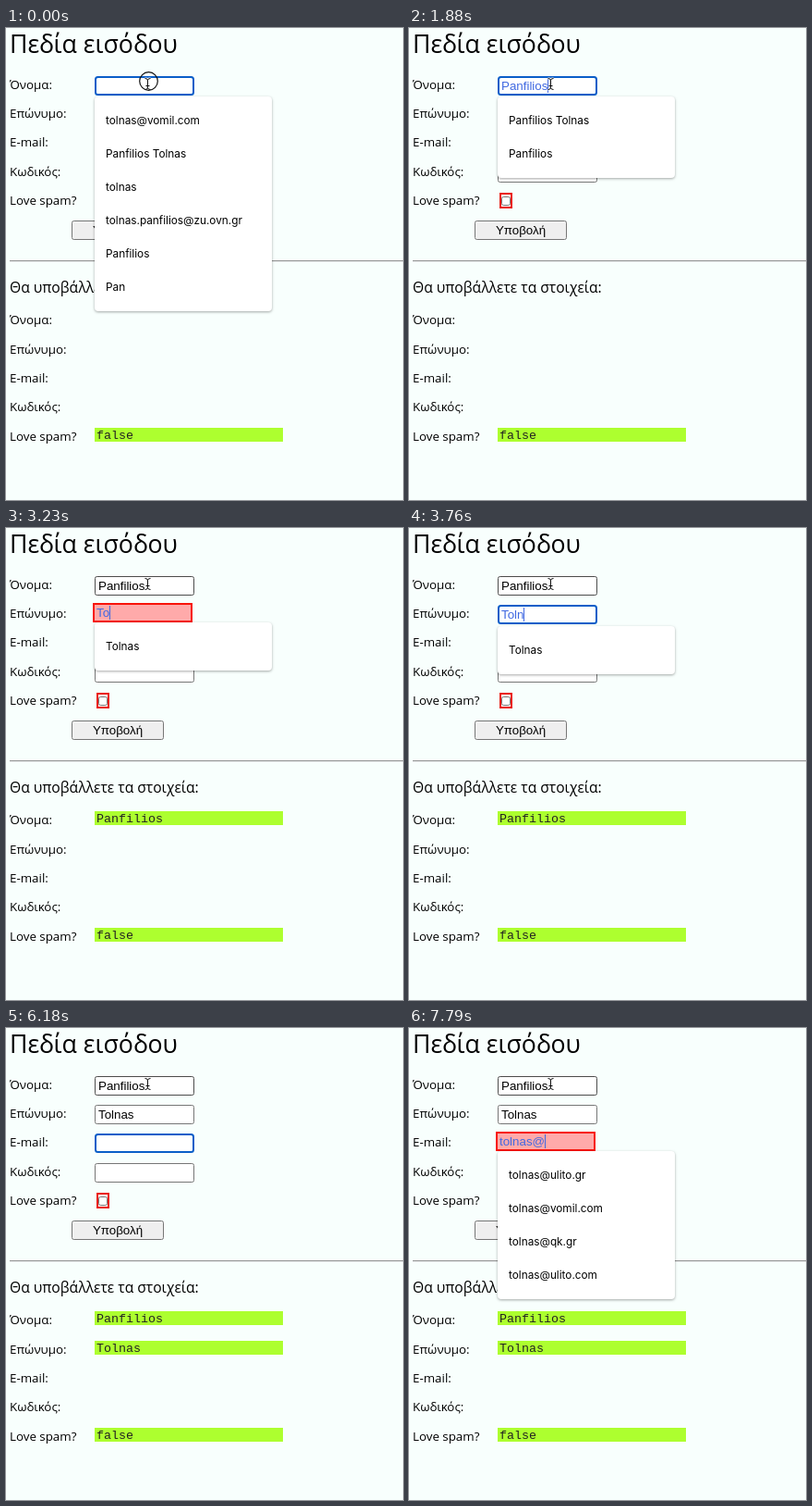
Animation of 430x510 px, one loop 8000 ms. Source, as an HTML page with a canvas:

```html
<!DOCTYPE html>
<html lang="el">
<head>
<meta charset="utf-8">
<style>
html, body { margin: 0; width: 430px; height: 510px; overflow: hidden; background: #f8fffd; }
canvas { display: block; }
</style>
</head>
<body>
<canvas id="stage" width="430" height="510"></canvas>
<script>
const ctx = document.getElementById('stage').getContext('2d');
const LOOP = 8000;
const LABEL = '13.333px "Open Sans", sans-serif';
const HEADING = '26.667px "Open Sans", sans-serif';
const SUBHEADING = '15.6px "Open Sans", sans-serif';
const INPUT = '13.333px "Liberation Sans", Arial, sans-serif';
const MONO = '13.333px "Liberation Mono", monospace';
const MENU = '11.8px Inter, sans-serif';

const labels = ['Όνομα:', 'Επώνυμο:', 'E-mail:', 'Κωδικός:', 'Love spam?'];
const formRows = [66, 97, 128, 160, 191];
const echoRows = [320, 352, 383, 414, 446];
const fieldTops = [52, 83, 114, 146];
const values = ['Panfilios', 'Tolnas', 'tolnas@'];

const full = 'Panfilios Tolnas', first = 'Panfilios', nick = 'Pan', variant = 'Panfilis';
const mails = ['tolnas@ulito.gr', 'tolnas@vomil.com', 'tolnas@qk.gr', 'tolnas@ulito.com'];
const longMail = 'tolnas.panfilios@zu.ovn.gr';
const all = [mails[1], full, 'tolnas', longMail, first, nick];
const four = [full, nick, first, variant];
const three = [full, first, variant];
const two = [full, first];
const one = ['Tolnas'];

// start time, focused field, typed characters, menu items, menu top, flags
const steps = [
  [0, 0, 0, all, 74, 'click'],
  [270, 0, 2, four, 71, 'invalid caret'],
  [540, 0, 3, four, 74, 'caret'],
  [810, 0, 4, three, 74, 'caret'],
  [1080, 0, 6, three, 74, 'caret'],
  [1350, 0, 7, three, 74, 'caret'],
  [1610, 0, 8, two, 74, 'caret'],
  [1880, 0, 9, two, 74, 'caret'],
  [2150, 1, 0, null, 0, 'caret'],
  [2690, 1, 0, null, 0, ''],
  [3230, 1, 2, one, 102, 'invalid caret'],
  [3490, 1, 3, one, 102, 'caret'],
  [3760, 1, 4, one, 106, 'caret'],
  [4030, 1, 5, one, 106, 'caret'],
  [4290, 1, 6, null, 0, 'caret'],
  [4830, 2, 0, null, 0, 'caret'],
  [5370, 2, 0, null, 0, ''],
  [5640, 2, 0, null, 0, 'caret'],
  [6180, 2, 0, null, 0, ''],
  [6440, 2, 2, [...mails, longMail], 133, 'invalid caret'],
  [6710, 2, 3, mails, 133, 'invalid caret'],
  [6980, 2, 5, mails, 133, 'invalid caret'],
  [7250, 2, 6, mails, 133, 'invalid caret'],
  [7790, 2, 7, mails, 133, 'invalid caret']
];

function text(str, x, y, font, color = '#000') {
  ctx.font = font;
  ctx.fillStyle = color;
  ctx.fillText(str, x, y);
}

function rect(x, y, w, h, color) {
  ctx.fillStyle = color;
  ctx.fillRect(x, y, w, h);
}

// Border drawn inside the given box.
function box(x, y, w, h, radius, fill, border, line) {
  ctx.beginPath();
  ctx.roundRect(x + line / 2, y + line / 2, w - line, h - line, radius);
  ctx.fillStyle = fill;
  ctx.fill();
  ctx.strokeStyle = border;
  ctx.lineWidth = line;
  ctx.stroke();
}

function field(i, focus, typed, flags) {
  const active = i === focus;
  const invalid = active && flags.includes('invalid');
  const x = invalid ? 94 : 96;
  const y = fieldTops[i] - (invalid ? 2 : 0);
  if (invalid) box(x, y, 108, 21, 0, '#ffaaaa', '#f8140a', 2);
  else if (active) box(x, y, 108, 21, 2.5, '#fff', '#0a5ec8', 2);
  else box(x, y, 108, 21, 2, '#fff', i ? '#767676' : '#4c4c4c', 1);

  const value = active ? values[i].slice(0, typed) : i < focus ? values[i] : '';
  text(value, x + 4, y + 15, INPUT, active ? '#4169e1' : '#000');
  if (active && flags.includes('caret')) {
    rect(Math.floor(x + 4 + ctx.measureText(value).width), y + 3, 1, 15, '#4169e1');
  }
}

function echo(row, value) {
  rect(96, echoRows[row] - 14, 204, 15, '#adff2f');
  text(value, 98, echoRows[row] - 2, MONO, '#222');
}

function menu(items, top) {
  ctx.save();
  ctx.shadowColor = 'rgba(0,0,0,.35)';
  ctx.shadowBlur = 3;
  ctx.shadowOffsetY = 1;
  ctx.fillStyle = '#fff';
  ctx.beginPath();
  ctx.roundRect(96, top, 192, items.length * 36 + 16, 4);
  ctx.fill();
  ctx.restore();
  items.forEach((item, i) => text(item, 108, top + 30 + i * 36, MENU));
}

function pointer(clicked) {
  const beam = new Path2D('M150.5 54.5Q153.5 54.5 153.5 56.5Q153.5 54.5 156.5 54.5' +
    'M153.5 56V65M151.5 62.5H155.5M150.5 66.5Q153.5 66.5 153.5 64.5Q153.5 66.5 156.5 66.5');
  for (const [color, width] of [['rgba(255,255,255,.8)', 2.6], ['#111', 1]]) {
    ctx.strokeStyle = color;
    ctx.lineWidth = width;
    ctx.stroke(beam);
  }
  if (clicked) {
    ctx.lineWidth = 1.2;
    ctx.beginPath();
    ctx.arc(154.5, 57.5, 9.8, 0, Math.PI * 2);
    ctx.stroke();
  }
}

function page() {
  rect(0, 0, 430, 510, '#f8fffd');
  text('Πεδία εισόδου', 4, 27, HEADING);
  labels.forEach((label, i) => {
    text(label, 4, formRows[i], LABEL);
    text(label, 4, echoRows[i], LABEL);
  });
  box(98, 178, 14, 17, 0, '#fff0f0', '#ea1c12', 2);
  box(100, 182, 10, 10, 2, '#fff', '#767676', 1);
  box(71, 208, 100, 21, 2, '#efefef', '#767676', 1);
  ctx.textAlign = 'center';
  text('Υποβολή', 121, 223, INPUT);
  ctx.textAlign = 'left';
  rect(4, 251, 426, 1, '#969696');
  rect(4, 252, 426, 1, '#e6eaea');
  text('Θα υποβάλλετε τα στοιχεία:', 4, 286, SUBHEADING);
}

function draw(now) {
  const t = now % LOOP;
  const [, focus, typed, items, top, flags] = steps.findLast(step => step[0] <= t);
  page();
  fieldTops.forEach((_, i) => field(i, focus, typed, flags));
  for (let i = 0; i < focus; i++) echo(i, values[i]);
  echo(4, 'false');
  if (items) menu(items, top);
  pointer(flags.includes('click'));
}

let start;
function tick(now) {
  start ??= now;
  draw(Math.max(0, now - start));
  requestAnimationFrame(tick);
}
draw(0);
requestAnimationFrame(tick);
</script>
</body>
</html>
```
